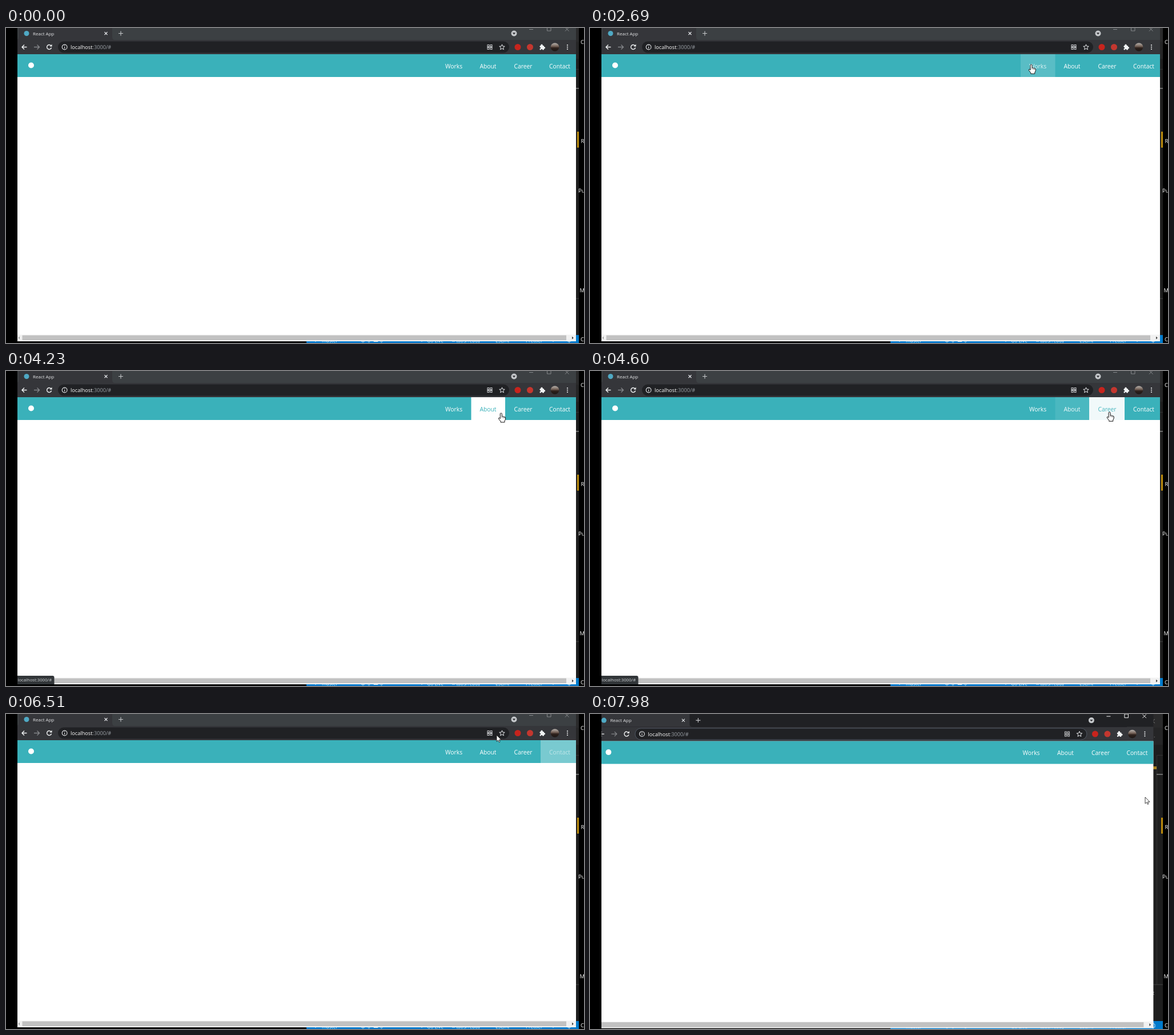
An HTML page with a canvas that plays this animation: 1012x553 px, repeating every 8000 ms.

```html
<!DOCTYPE html>
<html lang="en">
<head>
<meta charset="utf-8">
<title>Navigation hover</title>
<style>
html, body { margin: 0; width: 100%; height: 100%; overflow: hidden; background: #000; }
canvas { display: block; }
</style>
</head>
<body>
<canvas id="stage" width="1012" height="553"></canvas>
<script>
const ctx = document.getElementById('stage').getContext('2d');
const LOOP = 8000;
const FONT = '"Open Sans", "Noto Sans", sans-serif';
const TEAL = [58, 177, 186], WHITE = [255, 255, 255];

// Screen updates come in bursts: start, end, number of steps
const BURSTS = [
  [120, 460, 6], [860, 1630, 11], [1700, 2470, 12], [2540, 3280, 11], [3350, 4030, 11],
  [4160, 4940, 12], [5010, 5560, 8], [6160, 6840, 11], [7050, 7840, 12], [7910, 7980, 2]
];

// Pointer path: time, x, y
const PATH = [
  [120, 962, 545], [460, 636, 267], [860, 632, 262], [1630, 448, 98], [1800, 440, 95],
  [2470, 743, 78], [2620, 757, 68], [2690, 773, 64], [3280, 804, 71], [3410, 816, 72],
  [3555, 835, 72], [4030, 835, 73], [4160, 840, 73], [4250, 874, 74], [4590, 910, 72],
  [4940, 933, 71], [5010, 938, 70], [5200, 958, 67], [5560, 964, 66], [6160, 960, 64],
  [6840, 758, 10], [7050, 758, 10], [7260, 746.4, 11.6], [7340, 746.4, 11.6],
  [7600, 930, 105], [7840, 970.5, 145.5], [7980, 972, 146]
];

// Label, text x, cell left, cell right, hover start, hover end
const LINKS = [
  ['Works', 769, 754, 814.5, 2620, 3410],
  ['About', 829.5, 814.5, 874, 3400, 4260],
  ['Career', 889.5, 874, 936, 4250, 5020],
  ['Contact', 951, 936, 998, 5020, 6300]
];

const clamp = v => Math.max(0, Math.min(1, v));
const lerp = (a, b, p) => a + (b - a) * p;
const ramp = (t, a, b) => clamp((t - a) / (b - a));
const mix = (a, b, p) => `rgb(${a.map((v, i) => Math.round(lerp(v, b[i], p)))})`;

// CSS "ease" curve
function ease(p) {
  if (p <= 0 || p >= 1) return clamp(p);
  const curve = (s, a, b) => 3 * a * s * (1 - s) ** 2 + 3 * b * s * s * (1 - s) + s ** 3;
  let lo = 0, hi = 1;
  for (let i = 0; i < 20; i++) {
    const mid = (lo + hi) / 2;
    if (curve(mid, 0.25, 0.25) < p) lo = mid; else hi = mid;
  }
  return curve(lo, 0.1, 1);
}

function stepTime(t) {
  let now = 0;
  for (const [start, end, steps] of BURSTS) {
    if (t < start) break;
    const dt = (end - start) / (steps - 1);
    now = Math.min(end, start + Math.floor((t - start + 4) / dt) * dt);
  }
  return now;
}

function pointerAt(t) {
  for (let i = 1; i < PATH.length; i++) {
    const a = PATH[i - 1], b = PATH[i];
    if (t <= b[0]) {
      const p = ramp(t, a[0], b[0]);
      return [lerp(a[1], b[1], p), lerp(a[2], b[2], p)];
    }
  }
  return PATH[PATH.length - 1].slice(1);
}

function rect(x, y, w, h, color) {
  ctx.fillStyle = color;
  ctx.fillRect(x, y, w, h);
}

function round(x, y, w, h, r, color) {
  ctx.fillStyle = color;
  ctx.beginPath();
  ctx.roundRect(x, y, w, h, r);
  ctx.fill();
}

function dot(x, y, r, color) {
  ctx.fillStyle = color;
  ctx.beginPath();
  ctx.arc(x, y, r, 0, 7);
  ctx.fill();
}

function text(str, x, y, size, color) {
  ctx.font = `${size}px ${FONT}`;
  ctx.fillStyle = color;
  ctx.fillText(str, x, y);
}

function stroke(d, color, width = 1) {
  ctx.strokeStyle = color;
  ctx.lineWidth = width;
  ctx.stroke(new Path2D(d));
}

function fill(d, color) {
  ctx.fillStyle = color;
  ctx.fill(new Path2D(d));
}

function clipTo(x, y, w, h) {
  ctx.beginPath();
  ctx.rect(x, y, w, h);
  ctx.clip();
}

function drawDesktop() {
  rect(0, 0, 1012, 553, '#000');

  // Editor behind the browser
  rect(940, 0, 63, 553, '#1e1e1e');
  rect(940, 0, 63, 24, '#2a2a2b');
  rect(940, 24, 63, 30, '#252526');
  stroke('M992.5 475V72.5H1003', '#333');
  rect(940, 474.5, 63, 1, '#444');
  rect(940, 92, 52, 5, '#a8811d');
  rect(992, 105.5, 11, 1, '#b8b8b8');
  rect(1000, 182, 3, 28, '#bd8d0e');
  stroke('M989 9L985 12.500L989 16', '#777');
  text('.', 987, 41, 9, '#999');
  text('t', 985, 493, 9, '#aaa');

  rect(526, 539, 477, 14, '#007acc');
  const status = [['master', 553], ['0', 633], ['0', 655], ['Go Live', 737],
    ['tabs/ready', 788], ['ESLint', 857], ['Prettier', 910]];
  for (const [label, x] of status) text(label, x, 551.5, 8.5, '#e4f1fa');
  stroke('M542 544V551M601 546V550M728 544V551M958 545V551M781 550H786', '#d4e9f7');
  stroke('M622 546a3.500 3.500 0 1 0 6 0M644 550.500H651L647.500 544Z', '#d4e9f7');
  stroke('M983 550H989V545a3 3 0 0 0 -5 0V550M985 551.500H987', '#d4e9f7');

  const icons = [['C', 1006, 27.5], ['R', 1006.5, 201.5], ['Pu', 1002, 289],
    ['M', 1004.5, 463.5], ['C', 1006, 550]];
  for (const [label, x, y] of icons) text(label, x, y, 9.5, '#fff');
}

function drawTabs(active) {
  const bar = '#35363a', ink = active ? '#f4f4f4' : '#85888b';
  rect(9, -4, 989, 25, active ? '#202124' : '#3c4043');
  rect(22, -4, 164, 25, bar);
  fill('M186 16Q186 21 191 21H186ZM22 16Q22 21 17 21H22Z', bar);
  dot(36, 9.5, 4.5, '#4fa9c4');
  text('React App', 47, 12.5, 8, '#e4e5e7');
  stroke('M172.500 7L177.500 12M177.500 7L172.500 12', '#e8eaed', 1.1);
  stroke('M197 9.500H205M201 5.500V13.500', '#c6c8ca', 1.1);
  dot(889.5, 9.5, 5, '#c4c7ca');
  fill('M886.800 8.300H892.200L889.500 11.500Z', '#303134');
  stroke('M916 2.500H923M947.500 -1.500H954V5H947.500ZM979 -1L985.500 5.500M985.500 -1L979 5.500', ink);
}

function drawToolbar(active, caret) {
  rect(9, 21, 989, 25, '#35363a');
  stroke('M36.500 33.500H28.500M32 29.500L28 33.500L32 37.500', '#f1f3f4', 1.4);
  stroke('M49 33.500H58M54.500 29.500L58.500 33.500L54.500 37.500', '#85878a', 1.3);
  stroke('M79 31.300A4 4 0 1 0 79.500 34.500', '#f1f3f4', 1.4);
  fill('M80.500 28.500V32.500H76.500Z', '#f1f3f4');

  round(91, 23.5, 790, 20, 10, '#202124');
  if (active) {
    ctx.beginPath();
    ctx.roundRect(90.5, 23.5, 791, 20, 10);
    ctx.strokeStyle = '#4d5560';
    ctx.lineWidth = 1;
    ctx.stroke();
  }
  stroke('M107 33.500A4.400 4.400 0 1 1 98.200 33.500A4.400 4.400 0 1 1 107 33.500M102.600 33V36M102.600 30.700V31.800', '#e4e6e8', 1.1);
  text('localhost', 113, 37, 9.2, '#fff');
  const hostWidth = ctx.measureText('localhost').width;
  text(':3000/#', 113 + hostWidth, 37, 9.2, '#9aa0a6');
  if (caret) rect(184, 27.5, 1, 12, '#e8eaed');

  // Grid button, star
  for (const x of [843, 848]) for (const y of [29.5, 34.5]) {
    ctx.strokeStyle = '#c9cbce';
    ctx.lineWidth = 1;
    ctx.strokeRect(x, y, 3, 3);
  }
  rect(842, 33, 10, 1, '#9da0a3');
  ctx.beginPath();
  for (let i = 0; i < 10; i++) {
    const r = i % 2 ? 2.2 : 5, a = i * Math.PI / 5;
    ctx.lineTo(868.5 + r * Math.sin(a), 33.8 - r * Math.cos(a));
  }
  ctx.closePath();
  ctx.strokeStyle = '#e8eaed';
  ctx.stroke();

  // Extensions, avatar, menu
  dot(896, 33.5, 5.5, '#c7241d');
  dot(917.5, 33.5, 5.5, '#c4372f');
  round(934.5, 31, 7.5, 7.5, 1, '#f1f3f4');
  dot(938, 30.3, 1.8, '#f1f3f4');
  dot(942.3, 34.7, 1.8, '#f1f3f4');
  dot(934.7, 34.9, 1.3, '#35363a');
  dot(938, 38.3, 1.3, '#35363a');
  const photo = ctx.createLinearGradient(0, 26, 0, 41);
  photo.addColorStop(0, '#b9b5b1');
  photo.addColorStop(0.4, '#77645a');
  photo.addColorStop(0.6, '#2e211c');
  photo.addColorStop(1, '#1b1614');
  dot(961, 33.5, 7.3, photo);
  for (const y of [30, 33.5, 37]) dot(983, y, 1.1, '#f1f3f4');
}

function drawPage(t) {
  rect(9, 46, 989, 504, '#fff');
  rect(9, 46, 989, 40, mix(TEAL, WHITE, 0));
  dot(44, 65.5, 5, '#fff');
  for (const [label, x, left, right, on, off] of LINKS) {
    const p = ease(ramp(t, on, on + 500)) - ease(ramp(t, off, off + 500));
    if (p > 0) rect(left, 46, right - left, 40, mix(TEAL, WHITE, p));
    text(label, x, 70.8, 10.3, mix(WHITE, TEAL, p));
  }

  rect(9, 538.5, 989, 10.5, '#f1f1f1');
  rect(28.5, 539.5, 952.5, 8.7, '#c1c1c1');
  fill('M24 541.500V546.500L21.300 544Z', '#a3a3a3');
  fill('M991 541.500V546.500L993.800 544Z', '#404040');

  const shown = ramp(t, 2760, 2900) - ramp(t, 6380, 6500);
  if (shown > 0) {
    ctx.globalAlpha = shown;
    round(9, 535, 75.5, 15, [0, 3, 0, 0], '#323639');
    text('localhost:3000/#', 20.5, 545.3, 7.7, '#d0d3d6');
    ctx.globalAlpha = 1;
  }
}

function drawBrowser(t) {
  const active = t >= 7045;
  const drag = ramp(t, 7060, 7260);
  ctx.save();
  clipTo(20, 0, 992, 553);
  ctx.translate(-11.6 * drag, 1.6 * drag);
  drawTabs(active);
  drawToolbar(active, active && t < 7500);
  drawPage(t);
  ctx.restore();
}

function drawPointer(t) {
  if (t < 120) return;
  const [x, y] = pointerAt(t);
  if (t >= 7045 && t < 7330) dot(x, y + 0.5, 10.3, 'rgba(205, 188, 18, 0.86)');
  const hand = t > 2610 && t < 6300;
  const shape = hand
    ? 'M-1.500 1Q0 -1 1.500 1V6Q3 5 4 6.400Q5.300 5.700 6 7Q7.500 6.600 7.700 8.200V11L6.200 14V16.200H-0.800V14.500L-4.200 10.200Q-4.600 8 -2.800 8.400L-1.500 9.800Z'
    : 'M0 0V11.300L2.600 8.900L4.300 12.600L6 11.900L4.400 8.300H8Z';
  ctx.save();
  ctx.translate(x, y);
  fill(shape, '#fff');
  stroke(shape, '#111', hand ? 1 : 0.8);
  if (hand) stroke('M1.500 6V8.500M4 6.700V9M6 7.500V9.300', '#222', 0.7);
  ctx.restore();
}

function render(now) {
  const t = stepTime(now % LOOP);
  drawDesktop();
  drawBrowser(t);
  drawPointer(t);
}

const began = performance.now();
function tick() {
  render(performance.now() - began);
  requestAnimationFrame(tick);
}
tick();
</script>
</body>
</html>
```
